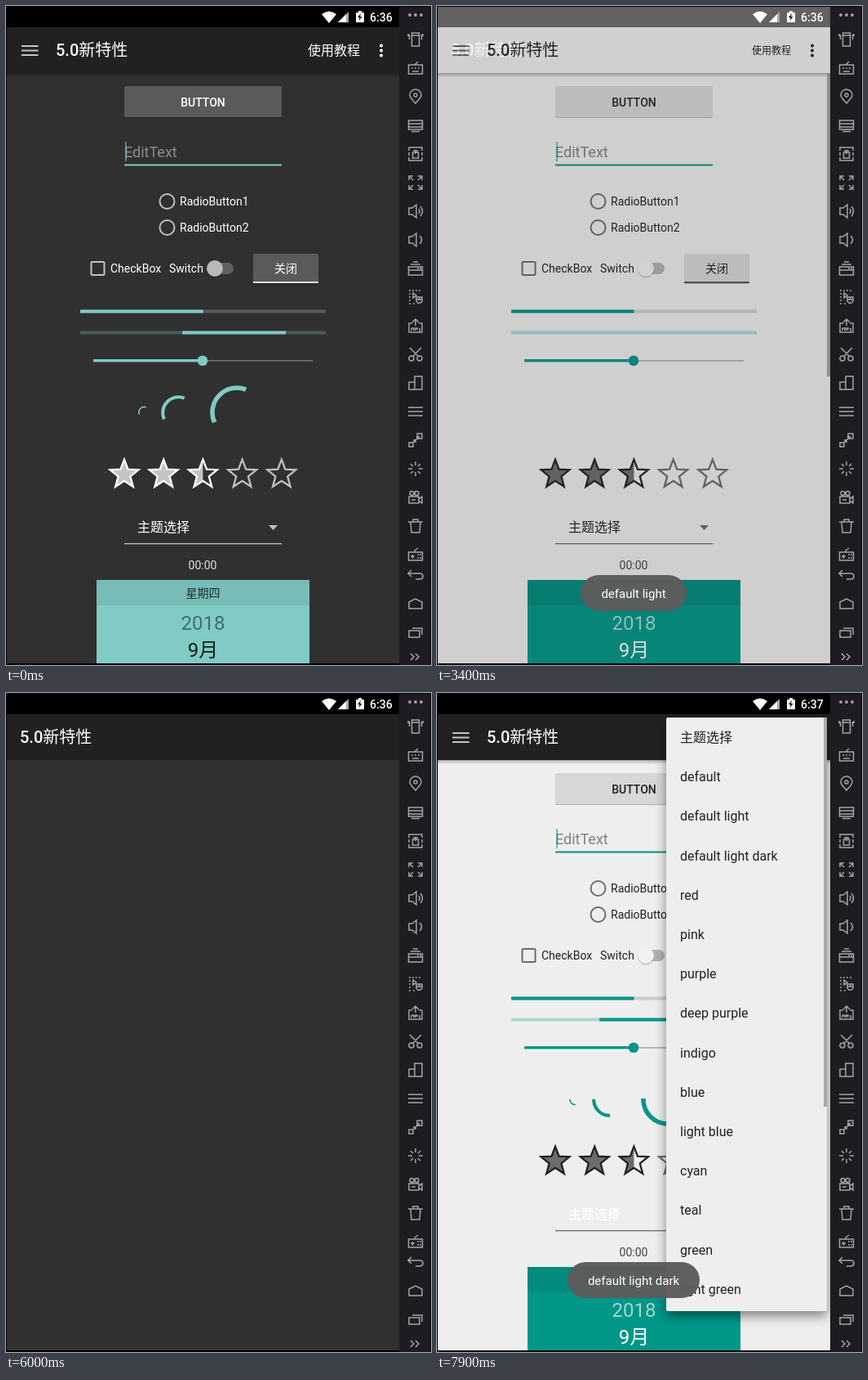
Recreate the animation shown at these times as an HTML page. Size 521 by 806 pixels, loop 8000 ms.

```html
<!DOCTYPE html>
<html lang="zh">
<head>
<meta charset="utf-8">
<style>
html, body { margin: 0; width: 100%; height: 100%; overflow: hidden; background: #000; }
svg { display: block; width: 521px; height: 806px; }
text { font-family: Roboto, "Noto Sans CJK SC", "Noto Sans CJK", sans-serif; font-size: 14px; white-space: pre; }
.medium { font-weight: 500; }
.mid { text-anchor: middle; }
.icons path { fill: none; stroke: #a4a4a6; stroke-width: 1.5; }
</style>
</head>
<body>
<svg id="stage" viewBox="0 0 521 806"></svg>
<script>
const LOOP = 8000;
const RATE = 1.105; // the device clock runs slightly fast against the recording
const BAR = { x: 91, width: 301 };

const dark = {
  bg: '#303030', bar: '#212121', status: '#000', accent: '#80cbc4', text: '#fff', barText: '#fff', barIcon: '#c4c4c4',
  spinnerText: '#fff', hint: '#8c8c8c', control: '#c1c1c1', button: '#5a5a5a', track: '#5a5a5a', thumb: '#b9b9b9',
  toggle: '#dedede', starLine: '#fff', starFill: '#c4c4c4', year: '#41706c', month: '#101c1b', day: '#1d2f2d',
  popup: '#303030', scroll: '#686868', chrono: '#e0e0e0', dayBg: '#77bcb5', action: 16
};
const light = {
  bg: '#eeeeee', bar: '#f2f2f2', status: '#757575', accent: '#009688', text: '#212121', barText: '#212121', barIcon: '#636363',
  spinnerText: '#212121', hint: '#808080', control: '#6c6c6c', button: '#d6d7d7', track: '#cccccc', thumb: '#f1f1f1',
  toggle: '#58595b', starLine: '#212121', starFill: '#6c6c6c', year: '#a3d7d2', month: '#fff', day: '#d5eeeb',
  popup: '#eeeeee', scroll: '#777', chrono: '#444', dayBg: '#008b7e', action: 12
};
const lightDark = { ...light, bar: '#212121', status: '#000', barText: '#fff', barIcon: '#c4c4c4', spinnerText: '#fff', scroll: '#aaa' };

// Times at which each screen is built up; phases are animation ages in ms.
const screens = [
  { theme: dark, start: 0, trimAge: 233, rotAge: 2130, barAge: 1550, open: 1400, close: 2800 },
  { theme: light, slide: 2870, fade: 3225, start: 3475, open: 4850, close: 5530, toast: 'default light', toastIn: 3130, toastOut: 4990 },
  { theme: lightDark, slide: 5690, fade: 6374, start: 6518, open: 7600, close: 9999, toast: 'default light dark', toastIn: 6270, toastOut: 9999 }
];
const options = ['主题选择', 'default', 'default light', 'default light dark', 'red', 'pink', 'purple', 'deep purple', 'indigo',
  'blue', 'light blue', 'cyan', 'teal', 'green', 'light green'];
const rings = [[169.5, 497, 6.6, 1.5], [211.5, 497.5, 19.3, 4], [283, 497, 30, 5.5]];

const clamp = v => Math.max(0, Math.min(1, v));
const ramp = (t, from, length) => clamp((t - from) / length);

function bezier(x1, y1, x2, y2) {
  const axis = (a, b, u) => 3 * a * u * (1 - u) ** 2 + 3 * b * u * u * (1 - u) + u ** 3;
  return x => {
    let lo = 0, hi = 1;
    for (let i = 0; i < 24; i++) {
      const u = (lo + hi) / 2;
      if (axis(x1, x2, u) < x) lo = u; else hi = u;
    }
    return axis(y1, y2, lo);
  };
}
const standard = bezier(.4, 0, .2, 1);

// Keys are [phase, value, easing towards the next key].
function keyed(keys, p) {
  let i = keys.length - 2;
  while (i > 0 && p < keys[i][0]) i--;
  const [p0, v0, ease] = keys[i], [p1, v1] = keys[i + 1];
  return v0 + (v1 - v0) * (ease || clamp)(clamp((p - p0) / (p1 - p0)));
}
const runners = [
  {
    move: [[0, -522.6], [.2, -522.6, bezier(.5, 0, .702, .496)], [.5915, -221.4, bezier(.302, .381, .55, .956)], [1, 199.6]],
    scale: [[0, .1], [.3665, .1, bezier(.335, .125, .786, 1)], [.6915, .827, bezier(.06, .11, .6, 1)], [1, .1]]
  }, {
    move: [[0, -197.6, bezier(.15, 0, .515, .41)], [.25, -62, bezier(.31, .284, .8, .734)], [.4835, 106.2, bezier(.4, .627, .6, .902)], [1, 379.4]],
    scale: [[0, .1, bezier(.205, .057, .577, .454)], [.1915, .571, bezier(.152, .196, .648, 1)], [.4415, .91, bezier(.258, 0, .212, 1.38)], [1, .1]]
  }
];

const rect = (x, y, w, h, fill, extra = '') => `<rect x="${x}" y="${y}" width="${w}" height="${h}" fill="${fill}" ${extra}/>`;
const text = (x, y, str, fill, size = 14, cls = '') => `<text x="${x}" y="${y}" fill="${fill}" style="font-size:${size}px" class="${cls}">${str}</text>`;
const circle = (x, y, r, fill, extra = '') => `<circle cx="${x}" cy="${y}" r="${r}" fill="${fill}" ${extra}/>`;

function star(cx, kind, c) {
  const points = Array.from({ length: 10 }, (_, i) => {
    const a = i * Math.PI / 5, r = i % 2 ? 7.8 : 18.3;
    return `${(cx + r * Math.sin(a)).toFixed(1)},${(573 - r * Math.cos(a)).toFixed(1)}`;
  });
  const fill = kind === 'full' ? points : kind === 'half' ? [points[0], ...points.slice(5)] : [];
  return `<polygon points="${fill.join(' ')}" fill="${c.starFill}"/>
    <polygon points="${points.join(' ')}" fill="none" stroke="${kind ? c.starLine : c.control}" stroke-width="2.3"/>`;
}

function startWindow() {
  return rect(0, 0, 482, 806, dark.bg) + rect(0, 0, 482, 26, '#000') + rect(0, 26, 482, 56, dark.bar)
    + text(17, 61, '5.0新特性', '#fff', 20, 'medium');
}

function screenMarkup(c) {
  const ring = `fill="none" stroke="${c.control}" stroke-width="2"`;
  const button = (x, y, w, h) => rect(x, y + 1, w, h, '#000', 'opacity=".25" rx="2"') + rect(x, y, w, h, c.button, 'rx="2"');
  return rect(0, 0, 482, 806, c.bg) + rect(0, 82, 482, 5, 'url(#shade)')
    + rect(0, 26, 482, 56, c.bar) + rect(0, 0, 482, 26, c.status)
    + [48, 53.5, 59].map(y => rect(19, y, 20.5, 2, c.barIcon)).join('')
    + text(61, 61, '5.0新特性', c.barText, 20, 'medium')
    + `<g text-anchor="end">${text(434, c.action === 16 ? 60 : 58.5, '使用教程', c.barText, c.action, 'medium')}</g>`
    + [48.5, 54.5, 60.5].map(y => circle(460, y, 2, c.barText)).join('')
    + button(145, 98, 193, 38) + text(241.5, 122.5, 'BUTTON', c.text, 14, 'medium mid')
    + text(145, 185, 'EditText', c.hint, 18) + rect(145, 193.5, 193, 2, c.accent)
    + rect(146, 166, 2, 24, c.accent, 'class="cursor" opacity=".55"')
    + [1, 2].map(n => `<circle cx="197.5" cy="${207 + 32 * n}" r="9" ${ring}/>` + text(213, 212 + 32 * n, 'RadioButton' + n, c.text)).join('')
    + `<rect x="104.5" y="313" width="16" height="16" rx="1" ${ring}/>`
    + text(128, 326, 'CheckBox', c.text) + text(200, 326, 'Switch', c.text)
    + rect(249, 314, 30, 14, c === dark ? '#606060' : '#b2b2b2', 'rx="7"')
    + circle(256, 322, 10.3, '#000', 'opacity=".2"') + circle(256, 321, 10, c.thumb)
    + button(303, 303, 80, 36) + rect(303, 337, 80, 2, c.toggle) + text(343, 326, '关闭', c.text, 14, 'medium mid')
    + rect(91, 371.5, 301, 4, c.track) + rect(91, 371.5, 150.5, 4, c.accent)
    + rect(91, 397.5, 301, 4, c.accent, 'opacity=".28"')
    + `<g clip-path="url(#barClip)">${rect(0, 397.5, 0, 4, c.accent, 'class="run"').repeat(2)}</g>`
    + rect(107, 433, 269, 1.7, c === dark ? '#6c6c6c' : '#b0b0b0') + rect(107, 432, 134, 3.4, c.accent) + circle(241, 433.7, 6.3, c.accent)
    + rings.map(([, , , w]) => `<path class="ring" fill="none" stroke="${c.accent}" stroke-width="${w}"/>`).join('')
    + ['full', 'full', 'half', '', ''].map((kind, i) => star(145 + 48.2 * i, kind, c)).join('')
    + text(161, 643, '主题选择', c.spinnerText, 16, 'medium')
    + `<path d="M322 635h11l-5.5 6z" fill="${c.control}"/>` + rect(145, 657, 193, 1.3, c.control)
    + text(241, 689, '00:00', c.chrono, 14, 'mid')
    + rect(111, 702, 261, 104, c.accent) + rect(111, 702, 261, 31, c.dayBg)
    + text(241.5, 723, '星期四', c.day, 14, 'medium mid')
    + text(241.5, 763, '2018', c.year, 24, 'mid') + text(241.5, 796, '9月', c.month, 24, 'mid')
    + rect(478, 82, 4, 371, '#8a8a8a', 'class="scroll" opacity="0"');
}

function popupMarkup(c) {
  return rect(281, 30, 197, 726, c.popup, 'rx="2" style="filter:drop-shadow(0 6px 7px rgba(0,0,0,.45))"')
    + options.map((name, i) => text(298, 60 + 48.2 * i, name, c.text, 16, i ? '' : 'medium')).join('')
    + rect(474, 30, 4, 476, c.scroll, 'class="popScroll"');
}

// Sidebar glyphs, drawn around their own centre, one every 35 px.
const glyphs = [
  'M-4.500-8h9v16h-9zM-4-5h8M-2 8h4M-7.500-6v6M7.500-6v6M-9-7v3M9-7v3',
  'M-8.500-4h17v11h-17zM-1-4l4-4M-5 0h2M-1 0h2M3 0h2M-4 4h8',
  'M0 8C-4 3-7 1-7-2A7 7 0 0 1 7-2C7 1 4 3 0 8ZM-2-2a2 2 0 1 0 4 0a2 2 0 1 0-4 0',
  'M-8.500-6h17v11h-17zM-8-2h16M-8 2h16M-5 7.500h10',
  'M-8-4v-4h16v4M-8 4v4h16v-4M-8-2v4M8-2v4M-3.500-2h7v7h-7zM-3-4h6M0-5v5',
  'M-8-3v-5h5M3-8h5v5M8 3v5h-5M-3 8h-5v-5M-7-7l4 4M7-7l-4 4M7 7l-4-4M-7 7l4-4',
  'M-8-4h4l5-4v16l-5-4h-4zM4-3q2 3 0 6M6-6q5 6 0 12',
  'M-8-4h4l5-4v16l-5-4h-4zM5-5q5 5 0 10',
  'M-8.500-2h17v10h-17zM-8 2h16M-6-5h12M-3-8h6M2 0h2M5 0h2',
  'M-8-8h2M-4-8h2M0-8h2M4-8h2M-8-4h2M-8 0h2M-8 4h2M-8 8h2M-3 8h2M-3-5l4 3l-4 3zM1 0h7v5q-3.500 5-7 0zM1 3h7M4.500 0v3',
  'M-4-3h-4v11h16v-11h-4M0 0v-8M-4-4l4-4l4 4M-5 3h3v3M-5 6v-3M0 6v-3h2v2M5 3v4',
  'M-7-8L4 3M7-8L-4 3M-8 5a3 3 0 1 0 6 0a3 3 0 1 0-6 0M2 5a3 3 0 1 0 6 0a3 3 0 1 0-6 0',
  'M-8-1h7v9h-7zM-1 8v-16h9v16z',
  'M-9-5h18M-9 0h18M-9 5h18',
  'M2-8h6v6h-6zM-8 3h5v5h-5zM-4 4L5-5M0 3v-3h-3M1-4h3v3',
  'M0-9v5M0 9v-5M-9 0h5M9 0h-5M-6-6l3 3M6 6l-3-3M6-6l-3 3M-6 6l3-3',
  'M-8-1h12v8h-12zM4 2l4-3v8l-4-3M-7-5a2 2 0 1 0 5 0a2 2 0 1 0-5 0M-1-5a2 2 0 1 0 5 0a2 2 0 1 0-5 0M-5 3h5',
  'M-9-5h18M-6-5l1 13h10l1-13M-3-5v-3h6v3',
  'M-8.500-3h17v10h-17zM-1-3v-2l4-3M-6 2h5M-3.500 0v5M2 0h2M5 0h2M2 4h2M5 4h2'
].map((d, i) => [41 + 35 * i, d]).concat([
  [696, 'M-5-6l-4 4l4 4M-9-2h14q4 0 4 3.500t-4 3.500h-5'],
  [731, 'M-8 6v-8l8-4l8 4v8z'],
  [766, 'M-8-2h13v8h-13zM-4-5h12v8'],
  [796, 'M-6-4l4 4l-4 4M0-4l4 4l-4 4']
]);

function sidebar() {
  return rect(482, 0, 39, 806, '#1d1c23') + rect(520, 0, 1, 806, '#000') + rect(482, 0, 39, 1, '#000')
    + [495, 502, 509].map(x => circle(x, 11, 1.9, '#a4a4a6')).join('')
    + `<g class="icons">${glyphs.map(([y, d]) => `<path transform="translate(502 ${y})" d="${d}"/>`).join('')}</g>`;
}

const statusIcons = `<path d="M387 10q9-7 18 0l-9 11z" fill="#fff"/><path d="M420 7v13h-13z" fill="#aaa"/><path d="M417 10v10h-10z" fill="#fff"/>
  <path d="M429 8h3v-2h4v2h3v12h-10z" fill="#fff"/><path d="M435 9l-4 5h2.500l-1 4l4-5h-2.500z" fill="#000"/>`;

const stage = document.getElementById('stage');
stage.innerHTML = `<defs>
    <clipPath id="barClip">${rect(BAR.x, 395, BAR.width, 9, '#000')}</clipPath>
    <linearGradient id="shade" x2="0" y2="1"><stop stop-opacity=".3"/><stop offset="1" stop-opacity="0"/></linearGradient>
  </defs>`
  + screens.map((s, i) => (i ? `<g id="window${i}">${startWindow()}</g>` : '')
    + `<g id="screen${i}">${screenMarkup(s.theme)}</g><g id="popup${i}">${popupMarkup(s.theme)}</g>`).join('')
  + statusIcons + '<text id="clock" x="446" y="19" fill="#fff" class="medium"></text>'
  + `<g id="toast"><rect y="696" height="44" rx="22" fill="#5c5c5c" fill-opacity=".97"/>${text(241, 723.5, '', '#fff', 15, 'mid')}</g>`
  + rect(0, 0, 1, 806, '#000') + rect(0, 0, 482, 1, '#000') + rect(0, 804, 521, 2, '#000') + sidebar();

const byId = id => document.getElementById(id);
const set = (el, attrs) => Object.entries(attrs).forEach(([k, v]) => el.setAttribute(k, v));
function show(el, opacity) {
  el.style.display = opacity > 0 ? '' : 'none';
  el.style.opacity = opacity;
}

function arc([cx, cy, r], from, sweep) {
  const at = turn => `${cx + r * Math.sin(turn * 2 * Math.PI)} ${cy - r * Math.cos(turn * 2 * Math.PI)}`;
  return `M${at(from)}A${r} ${r} 0 ${sweep > .5 ? 1 : 0} 1 ${at(from + sweep)}`;
}

function animateWidgets(root, s, t, popupOpen) {
  const age = (t - s.start) * RATE, running = age > 0;
  const p = (age + (s.trimAge || 0)) / 1333 % 1;
  const tail = .75 * standard(clamp(p * 2 - 1)), head = .75 * standard(clamp(p * 2));
  const turn = (age + (s.rotAge || 0)) * 2 / 6665 + p / 4;
  root.querySelectorAll('.ring').forEach((el, i) =>
    el.setAttribute('d', running || !s.slide ? arc(rings[i], turn + tail, Math.max(.01, head - tail)) : ''));

  const q = (age + (s.barAge || 0)) / 2000 % 1, unit = BAR.width / 360;
  root.querySelectorAll('.run').forEach((el, i) => {
    const half = 144 * keyed(runners[i].scale, q), centre = 180 + keyed(runners[i].move, q);
    set(el, { x: BAR.x + (centre - half) * unit, width: running || !s.slide ? 2 * half * unit : 0 });
  });

  const lit = popupOpen ? !!s.slide : !running || age % 1000 < 500;
  root.querySelector('.cursor').style.display = lit ? '' : 'none';
  root.querySelector('.scroll').setAttribute('opacity', s.slide ? .75 * (1 - ramp(t, s.start + 500, 250)) : 0);
}

function draw(t) {
  let toast = null;
  screens.forEach((s, i) => {
    const next = screens[i + 1];
    const alive = !next || t < next.fade;
    const opacity = alive ? (s.slide ? ramp(t, s.fade, 210) : 1) : 0;
    const popup = ramp(t, s.open, 180) * (1 - ramp(t, s.close, 90));
    const root = byId('screen' + i), menu = byId('popup' + i);
    show(root, opacity);
    if (opacity) animateWidgets(root, s, t, popup > 0);
    show(menu, popup);
    menu.querySelector('.popScroll').setAttribute('opacity', 1 - ramp(t, s.open + 1000, 250));
    if (s.slide) {
      const k = ramp(t, s.slide, 330), win = byId('window' + i);
      show(win, alive && opacity < 1 ? clamp(k * 2) : 0);
      win.setAttribute('transform', `translate(0 ${64 * (1 - k) ** 2.5})`);
      if (t >= s.toastIn) toast = s;
    }
  });

  const box = byId('toast');
  show(box, toast ? ramp(t, toast.toastIn, 200) * (1 - ramp(t, toast.toastOut, 230)) : 0);
  if (toast) {
    const width = toast.toast.length > 14 ? 162 : 130;
    set(box.firstChild, { x: 241 - width / 2, width });
    box.lastChild.textContent = toast.toast;
  }
  byId('clock').textContent = t < 6900 ? '6:36' : '6:37';
}

const begin = performance.now();
function tick() {
  draw((performance.now() - begin) % LOOP);
  requestAnimationFrame(tick);
}
tick();
</script>
</body>
</html>
```
